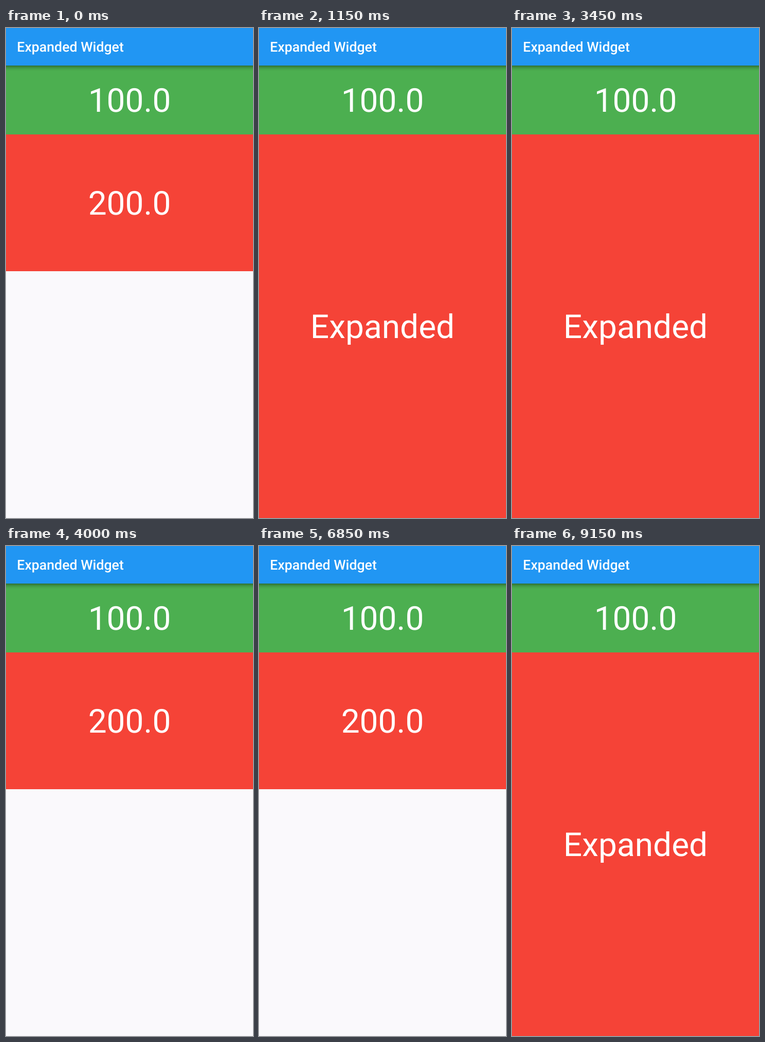
An HTML page that plays this animation: 480 px wide and 953 px high, repeating every 9.7 s.

```html
<!DOCTYPE html>
<html lang="en">
<head>
<meta charset="utf-8">
<title>Expanded Widget</title>
<style>
  html, body { margin: 0; width: 100%; height: 100%; overflow: hidden; background: #faf9fc; }
  svg { display: block; width: 100%; height: 100%; }
  text { font: 400 64px Roboto, sans-serif; fill: #fff; text-anchor: middle; text-rendering: geometricPrecision; }
  .title { font-size: 26.67px; font-weight: 500; text-anchor: start; }
  #expanded { opacity: 0; }
</style>
</head>
<body>
<svg viewBox="0 0 480 953">
  <defs>
    <linearGradient id="shadow" x2="0" y2="1">
      <stop offset="0" stop-opacity=".36"/>
      <stop offset=".3" stop-opacity=".2"/>
      <stop offset=".6" stop-opacity=".07"/>
      <stop offset="1" stop-opacity="0"/>
    </linearGradient>
  </defs>
  <rect width="480" height="953" fill="#faf9fc"/>
  <g id="fixed">
    <rect y="207" width="480" height="266" fill="#f54337"/>
    <text x="240" y="362.5">200.0</text>
  </g>
  <g id="expanded">
    <rect y="207" width="480" height="746" fill="#f54337"/>
    <text x="240" y="602.5">Expanded</text>
  </g>
  <rect y="73" width="480" height="134" fill="#4caf50"/>
  <text x="240" y="162.5">100.0</text>
  <rect y="73" width="480" height="11" fill="url(#shadow)"/>
  <rect width="480" height="73" fill="#2196f3"/>
  <text class="title" x="21.33" y="45.6">Expanded Widget</text>
</svg>
<script>
  const LOOP = 9700;
  // [start ms, expanded?]
  const steps = [[0, 0], [1150, 1], [4000, 0], [7450, 1], [LOOP, 1]];

  document.getElementById('expanded').animate(
    steps.map(([ms, opacity]) => ({ offset: ms / LOOP, opacity, easing: 'step-end' })),
    { duration: LOOP, iterations: Infinity }
  );
</script>
</body>
</html>
```
